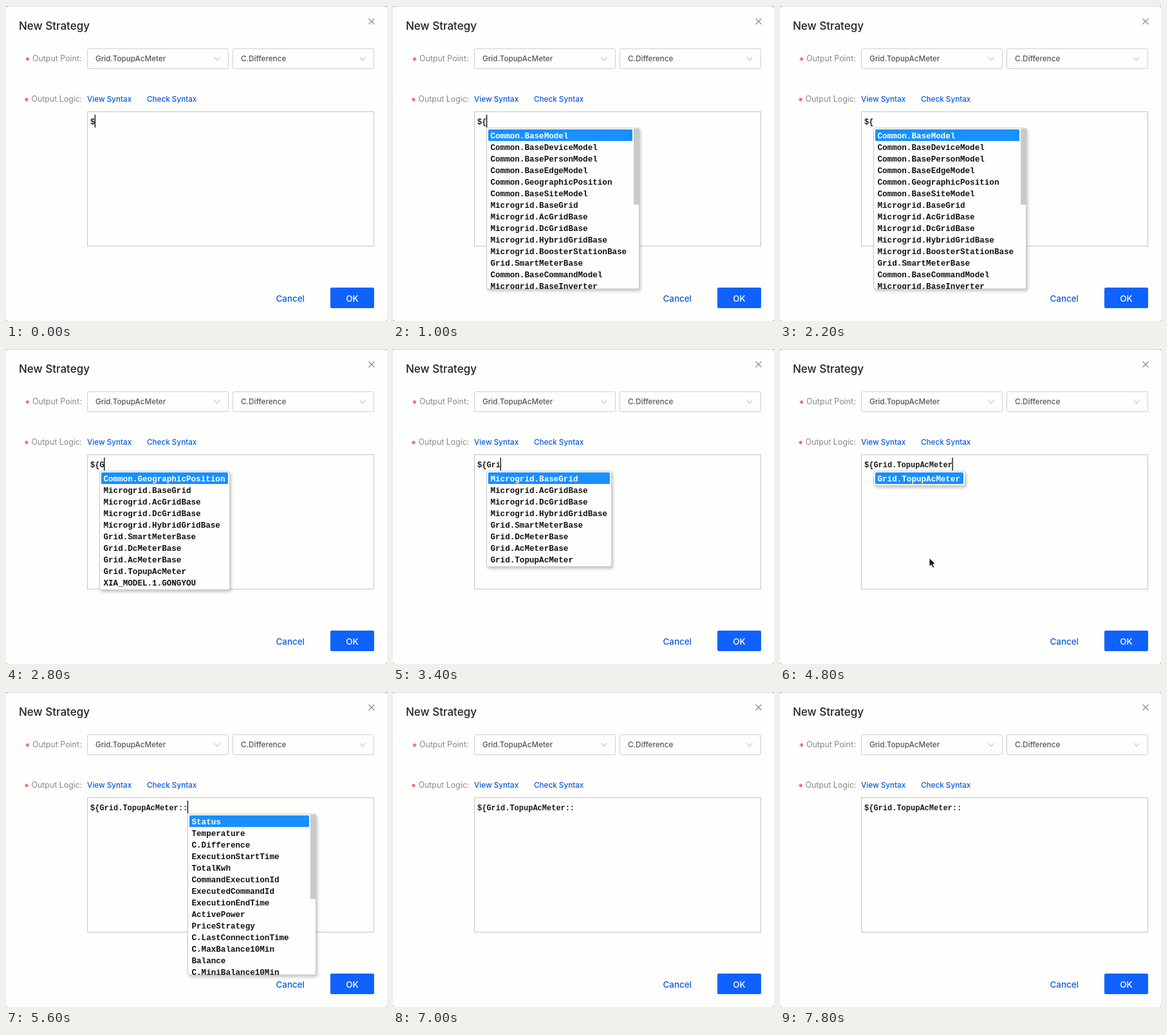
An HTML page that plays this animation: 592 px wide and 490 px high, repeating every 8000 ms.

```html
<!DOCTYPE html>
<html lang="en">
<head>
<meta charset="utf-8">
<title>New Strategy</title>
<style>
  html, body { margin: 0; width: 100%; height: 100%; overflow: hidden; background: #fefefd; }
  svg { display: block; width: 100vw; height: 100vh; font-family: Inter, sans-serif; font-size: 11.7px; }
  .mono { font: bold 12px "Liberation Mono", monospace; white-space: pre; fill: #1c1c1c; }
  .list { font-size: 12.6px; }
  .label { fill: #888; font-size: 12.4px; }
  .value { fill: #555; font-weight: 500; }
  .link { fill: #0a5be0; font-weight: 500; }
  .box { fill: #fefefd; stroke: #cfcfcf; }
  .icon { fill: none; stroke: #bbb; stroke-width: 1.1; }
  .star { stroke: #e5434d; stroke-width: 1.1; }
  .popup { filter: drop-shadow(2px 3px 2px rgba(0, 0, 0, .22)); }
</style>
</head>
<body>
<svg viewBox="0 0 592 490">
  <rect width="592" height="490" fill="#b4b4b4"/>
  <rect y=".6" width="592" height="489.4" rx="4" fill="#fefefd"/>
  <text x="20" y="37" font-size="17" font-weight="500" fill="#222">New Strategy</text>
  <path d="M563.5 19.5l9 9m0-9l-9 9" class="icon" style="stroke:#888"/>

  <path d="M33.5 79.5v6m-2.600-4.500l5.200 3m0-3l-5.200 3" class="star"/>
  <text x="41" y="86" class="label">Output Point</text>
  <text x="114.500" y="86" class="label">:</text>
  <rect x="126.5" y="66.5" width="219" height="31" rx="2" class="box"/>
  <rect x="352.5" y="66.5" width="219" height="31" rx="2" class="box"/>
  <text x="139" y="86" class="value">Grid.TopupAcMeter</text>
  <text x="365" y="86" class="value">C.Difference</text>
  <path d="M323.5 79.5l4.5 5 4.5-5M549.5 79.5l4.5 5 4.5-5" class="icon"/>

  <path d="M32 142.5v6m-2.600-4.500l5.200 3m0-3l-5.200 3" class="star"/>
  <text x="39.5" y="149" class="label">Output Logic</text>
  <text x="114.500" y="149" class="label">:</text>
  <text x="126" y="149" class="link">View Syntax</text>
  <text x="219" y="149" class="link">Check Syntax</text>
  <rect x="126.5" y="164.5" width="445" height="209" class="box" style="stroke:#c4c4c4"/>

  <text x="419.5" y="460" class="link" font-size="13.400">Cancel</text>
  <rect x="504" y="438" width="68" height="32" rx="2" fill="#0f62fe"/>
  <text x="538" y="460" font-size="13.400" font-weight="500" fill="#fff" text-anchor="middle">OK</text>

  <text id="code" x="131" y="184" class="mono"/>
  <path id="caret" stroke="#111" stroke-width="1.4"/>
  <clipPath id="clip"><rect id="clipBox" y="190"/></clipPath>
  <g id="popup"/>
  <path id="arrow" d="M0 0v13.6l3.2-2.9 2.2 4.9 2.4-1.1-2.2-4.7h4.2z" fill="#111" stroke="#fff"/>
  <path id="hand" d="M.6 1.2C1.4-.3 3.2.2 3.6 1.6l1.5 4.3c.7-.8 2-.5 2.3.4.8-.7 1.9-.4 2.2.5 1-.5 2 .1 2.2 1.2l.6 3.4c.2 1.500-.8 2.600-1 4.600H5.200c-.6-2-3.200-3.600-4.300-5.500-.6-1.200.7-2.200 1.900-1.100l.9.8L.5 2.500zM6.400 10.500v3m2-3v3m2-3v3" fill="#fff" stroke="#222"/>
</svg>
<script>
const $ = id => document.getElementById(id);
const CHAR = 7.2, LIST_CHAR = 7.56, ROW = 18, TOP = 190, STEP = 200, LOOP = 8000;

const prefix = (head, names) => names.map(n => head + n);
const grids = prefix('Microgrid.', ['BaseGrid', 'AcGridBase', 'DcGridBase', 'HybridGridBase']);
const meters = prefix('Grid.', ['SmartMeterBase', 'DcMeterBase', 'AcMeterBase', 'TopupAcMeter']);
const models = [
  ...prefix('Common.', ['BaseModel', 'BaseDeviceModel', 'BasePersonModel', 'BaseEdgeModel', 'GeographicPosition', 'BaseSiteModel']),
  ...grids, 'Microgrid.BoosterStationBase', meters[0], 'Common.BaseCommandModel', 'Microgrid.BaseInverter'
];
const points = ['Status', 'Temperature', 'C.Difference', 'ExecutionStartTime', 'TotalKwh', 'CommandExecutionId',
  'ExecutedCommandId', 'ExecutionEndTime', 'ActivePower', 'PriceStrategy', 'C.LastConnectionTime',
  'C.MaxBalance10Min', 'Balance', 'C.MiniBalance10Min'];

const allModels = { items: models, x: 145.5, width: 237, thumb: 118 };
const withG = { items: ['Common.GeographicPosition', ...grids, ...meters, 'XIA_MODEL.1.GONGYOU'], x: 145.5 };
const withGrid = { items: [...grids, ...meters], x: 145.5 };
const chosen = { items: [meters[3]], x: 145.5 };
const allPoints = { items: points, x: 282.5, width: 199, thumb: 131 };

// Typed text and suggestions from each moment on
const keys = [
  [0, '$'],
  [600, '${', allModels],
  [2600, '${G', withG],
  [3000, '${Gr', withGrid],
  [3400, '${Gri', withGrid],
  [3600, '${Grid', withGrid],
  [4600, '${Grid.TopupAcMeter', chosen],
  [5000, '${Grid.TopupAcMeter:'],
  [5200, '${Grid.TopupAcMeter::', allPoints]
];
const CLOSE = 6800;

function drawPopup(list) {
  if (!list) { $('popup').innerHTML = ''; return; }
  const { items, x, thumb } = list;
  const longest = Math.max(...items.map(s => s.length));
  const width = list.width || Math.round(longest * LIST_CHAR + 13);
  const height = thumb ? 250 : items.length * ROW + 4.5;
  const barWidth = width - (thumb ? 13 : 5);
  const rows = items.map((s, i) =>
    `<text x="${x + 6}" y="${TOP + 15.5 + i * ROW}" fill="${i ? '#111' : '#fff'}">${s}</text>`).join('');
  $('clipBox').setAttribute('x', x);
  $('clipBox').setAttribute('width', width);
  $('clipBox').setAttribute('height', height);
  $('popup').innerHTML =
    `<rect class="popup" x="${x}" y="${TOP}" width="${width}" height="${height}" rx="2" fill="#fefefd" stroke="#c8c8c8"/>
     <rect x="${x + 2.5}" y="${TOP + 2}" width="${barWidth}" height="${ROW}" rx="1.5" fill="#1890ff"/>
     ${thumb ? `<rect x="${x + width - 8.5}" y="${TOP + 1}" width="8" height="${thumb}" fill="#c9c9c9"/>` : ''}
     <g class="mono list" clip-path="url(#clip)">${rows}</g>`;
}

function place(id, show, x, y) {
  $(id).setAttribute('visibility', show ? 'visible' : 'hidden');
  $(id).setAttribute('transform', `translate(${x} ${y})`);
}

function draw(t) {
  const [since, text, list] = keys.filter(k => k[0] <= t).pop();
  $('code').textContent = text;
  const x = 131.2 + text.length * CHAR;
  $('caret').setAttribute('d', `M${x} 169v20`);
  $('caret').setAttribute('visibility', (t - since) % 1000 < 500 ? 'visible' : 'hidden');
  drawPopup(t < CLOSE ? list : null);
  place('hand', t >= 4000 && t < 4600, t < 4200 ? 243 : 234.5, 318);
  place('arrow', t >= 4600 && t < 5000, 232, 325);
}

let last = -1;
function tick(now) {
  const t = Math.floor(now % LOOP / STEP) * STEP;
  if (t !== last) draw(last = t);
  requestAnimationFrame(tick);
}
draw(0);
requestAnimationFrame(tick);
</script>
</body>
</html>
```
